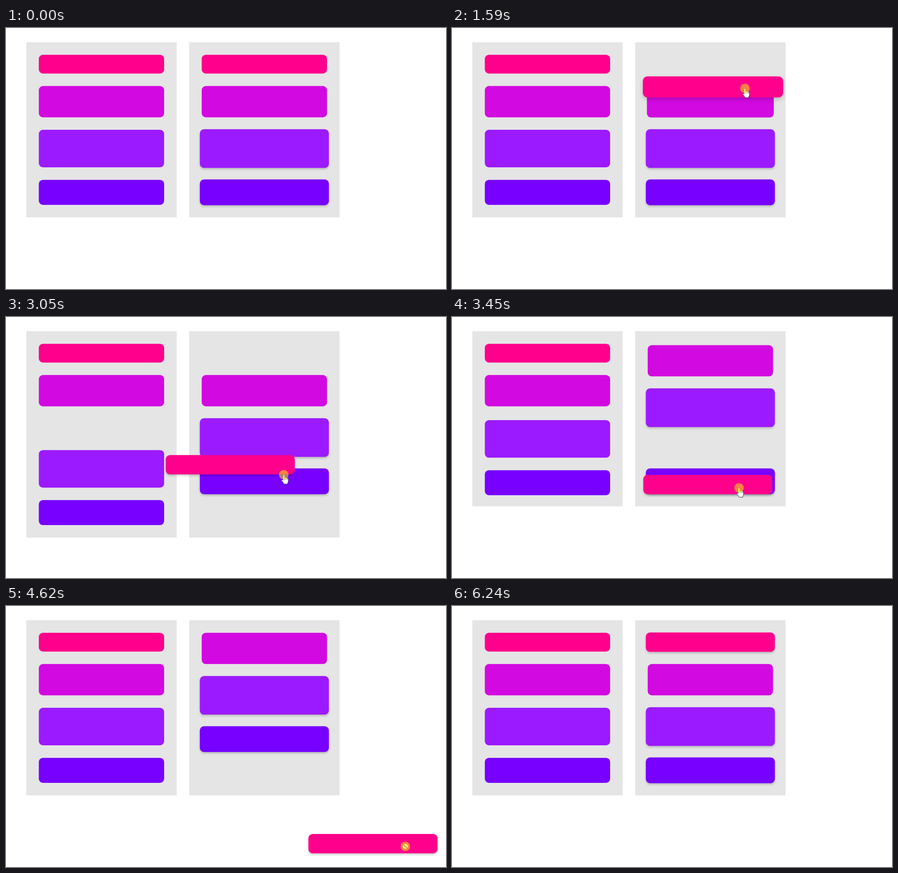
Write an HTML page that moves like this. It is 971 px wide and 577 px high and loops after 7.27 s.

```html
<!DOCTYPE html>
<html lang="en">
<head>
<meta charset="utf-8">
<title>Drag between lists</title>
<style>
  html, body { margin: 0; width: 100%; height: 100%; overflow: hidden; background: #fff; }
  svg { display: block; width: 971px; height: 577px; }
</style>
</head>
<body>
<svg viewBox="0 0 971 577" xmlns="http://www.w3.org/2000/svg">
  <g id="panels" fill="#e5e5e5"></g>
  <g id="cards"></g>
  <g id="pointer">
    <path id="arrow" d="M.5 .5V16L4 12.8L6.3 18L8.6 17L6.4 12H11.3Z" fill="#fff" stroke="#111" stroke-width=".9"/>
    <g id="hand" fill="#fff" stroke="#2a1a3a" stroke-width=".9" stroke-linejoin="round">
      <path d="M-1.7 1.8Q-1.7 .4 0 .4Q1.7 .4 1.7 1.8V6.3Q4 5 5 6.6Q7.5 5.6 8.2 7.5Q10.2 7 10.2 9.5V14Q10 16.5 8.5 18.5V20.5H.2Q-1 17.5-4.2 13.8Q-5.6 11.5-4.5 10.8Q-3.2 10.3-1.7 12.3Z"/>
      <path d="M1.7 6.3V11M5 6.8V11M8.2 7.6V11" fill="none"/>
    </g>
    <g id="denied">
      <circle r="5.6" fill="#fff"/>
      <path d="M-3.8-3.8L3.8 3.8" stroke="#c01060" stroke-width="2.2"/>
    </g>
    <circle id="press" r="10.5" fill="#ff0" fill-opacity=".5"/>
  </g>
</svg>
<script>
const LOOP = 7270;
const U = 1.3825;                      // stage pixels per layout unit
const TOP = 31.5, GAP = 20 * U, WIDTH = 200 * U, PANEL_WIDTH = 240 * U;
const LEFT = [44.8, 44.8 + PANEL_WIDTH + GAP];
const HEIGHTS = [30, 50, 60, 40].map(h => h * U);
const COLORS = ['#ff008c', '#d309e1', '#9c1aff', '#7700ff'];
const SLOT = HEIGHTS[0] + GAP;         // room taken by the dragged card
const PANEL = HEIGHTS.reduce((sum, h) => sum + h + GAP, GAP);

// moments of the story, in ms
const SHOW = 70, HOVER = 940, PRESS = 1290, GRAB = 1380, SWAP = 1600, AWAY = 2550,
      BACK = 3130, LEAVE = 3812, DROP = 5049, EXIT = 5830, HIDE = 6240;

// card index at which each list opens a gap
const LEFT_GAP = [[AWAY, 2], [BACK, 4]];
const RIGHT_GAP = [[SWAP, 1], [AWAY, 0], [BACK, 2], [LEAVE, 3], [DROP, 0]];

const HOME = { x: LEFT[1] + PANEL_WIDTH / 2, y: TOP + GAP + HEIGHTS[0] / 2 };
const HOLD = { x: 70, y: 6.5 };        // pointer's place on the held card
const LAG = 24;                        // the card trails the pointer

// key points [time, x, y]
const APPROACH = [
  [SHOW, 914, 540], [520, 837, 324], [640, 837, 324], [960, 645, 94],
  [GRAB, HOME.x + HOLD.x, HOME.y + HOLD.y]
];
const DRAG = [
  [GRAB, HOME.x, HOME.y], [1500, 575, 132], [1590, 576, 130.2], [1680, 576, 129],
  [1900, 558, 304], [2130, 527, 201], [2360, 464.7, 211.3], [2600, 325, 240],
  [2900, 265, 285], [3050, 493.3, 326.2], [3100, 575, 355], [3690, 584, 392],
  [3850, 791, 481], [3990, 858.7, 504.2], [4140, 872, 524], [4390, 803, 531],
  [4690, 812.4, 524.5]
];
const DEPART = [[5780, 882, 530.5], [5860, 888, 521], [6085, 933, 563]];

const $ = id => document.getElementById(id);
const show = (id, on) => $(id).setAttribute('display', on ? 'inline' : 'none');
const mix = (a, b, p) => a + (b - a) * p;

function set(el, attrs) {
  for (const k in attrs) el.setAttribute(k, attrs[k]);
  return el;
}
function addRect(id, attrs) {
  const el = document.createElementNS('http://www.w3.org/2000/svg', 'rect');
  return $(id).appendChild(set(el, attrs));
}

// cubic-bezier(.4, 0, .1, 1), solved by bisection
function ease(x) {
  if (x <= 0) return 0;
  if (x >= 1) return 1;
  let s = .5;
  for (let step = .25; step > 1e-6; step /= 2) {
    const v = 1.2 * s * (1 - s) ** 2 + .3 * s * s * (1 - s) + s ** 3;
    s += v < x ? step : -step;
  }
  return s * s * (3 - 2 * s);
}

// value that eases to a new target at each [time, target]
const track = (t, start, steps, span = 450) =>
  steps.reduce((v, [at, to]) => mix(v, to, ease((t - at) / span)), start);

// smooth curve through [time, x, y]
function follow(keys, t) {
  const last = keys.length - 1;
  t = Math.max(keys[0][0], Math.min(keys[last][0], t));
  const i = Math.max(1, keys.findIndex(k => k[0] >= t));
  const a = keys[i - 1], b = keys[i];
  const span = b[0] - a[0], p = (t - a[0]) / span;
  const slope = (j, n) => {
    if (j === 0 || j === last) return 0;
    const q = keys[j - 1], r = keys[j + 1];
    return (r[n] - q[n]) / (r[0] - q[0]) * span;
  };
  const axis = n => {
    const d = b[n] - a[n], s0 = slope(i - 1, n), s1 = slope(i, n);
    return a[n] + p * (s0 + p * (3 * d - 2 * s0 - s1 + p * (s0 + s1 - 2 * d)));
  };
  return { x: axis(1), y: axis(2) };
}

const panels = LEFT.map(x => addRect('panels', { x, y: TOP, width: PANEL_WIDTH }));
const cards = LEFT.map(() => COLORS.map(fill => addRect('cards', { fill })));
const pink = cards[1][0];

function shift(t, side, i) {
  const steps = side
    ? RIGHT_GAP.map(([at, gap]) => [at, i > 0 && i <= gap ? -SLOT : 0])
    : LEFT_GAP.map(([at, gap]) => [at, i >= gap ? SLOT : 0]);
  return track(t, 0, steps);
}

function scale(t, side, i) {
  if (side === 0) return 1;
  if (i === 0) return track(t, 1, [[HOVER, 1.03], [PRESS, 1.12], [AWAY - 70, 1.03]], 200);
  if (i === 1) return track(t, 1, [[HOVER - 150, 1.03], [HOVER, 1], [SWAP - 80, 1.02], [SWAP, 1]], 200);
  return 1.03;
}

function place(el, cx, cy, h, s) {
  set(el, {
    x: cx - WIDTH * s / 2, y: cy - h * s / 2, width: WIDTH * s, height: h * s, rx: 9 * s
  });
  const near = Math.min(1, (s - 1) / .03), far = Math.max(0, (s - 1.03) / .09);
  el.style.filter = near < .02 ? 'none' :
    `drop-shadow(0 ${3 * near + 1.5 * far}px ${2 * near + 3 * far}px rgba(0,0,0,${.2 * near}))`;
}

function pointerAt(t) {
  if (t < GRAB) return follow(APPROACH, t);
  if (t >= DROP) return follow(DEPART, t);
  const card = follow(DRAG, t + LAG);
  return { x: card.x + HOLD.x, y: card.y + HOLD.y };
}

function draw(t) {
  const tall = t >= AWAY && t < BACK;
  panels.forEach(p => set(p, { height: PANEL + (tall ? SLOT : 0) }));

  cards.forEach((list, side) => {
    let y = TOP + GAP;
    list.forEach((el, i) => {
      const h = HEIGHTS[i];
      let cx = LEFT[side] + PANEL_WIDTH / 2;
      let cy = y + h / 2 + shift(t, side, i);
      if (el === pink) {
        const from = follow(DRAG, t), p = ease((t - DROP) / 450);
        cx = mix(from.x, cx, p);
        cy = mix(from.y, cy, p);
      }
      place(el, cx, cy, h, scale(t, side, i));
      y += h + GAP;
    });
  });

  // the held card floats above both lists
  const held = t >= PRESS && t < DROP;
  const group = $('cards');
  if (held !== (group.lastChild === pink)) group.insertBefore(pink, held ? null : cards[1][1]);

  const { x, y } = pointerAt(t);
  set($('pointer'), { transform: `translate(${x} ${y})` });
  const arrow = t < HOVER - 150 || t >= EXIT;
  const denied = t >= LEAVE && t < DROP;
  show('pointer', t >= SHOW && t < HIDE);
  show('arrow', arrow);
  show('denied', denied);
  show('hand', !arrow && !denied);
  show('press', held);
}

const begin = performance.now();
function tick() {
  draw((performance.now() - begin) % LOOP);
  requestAnimationFrame(tick);
}
tick();
</script>
</body>
</html>
```
